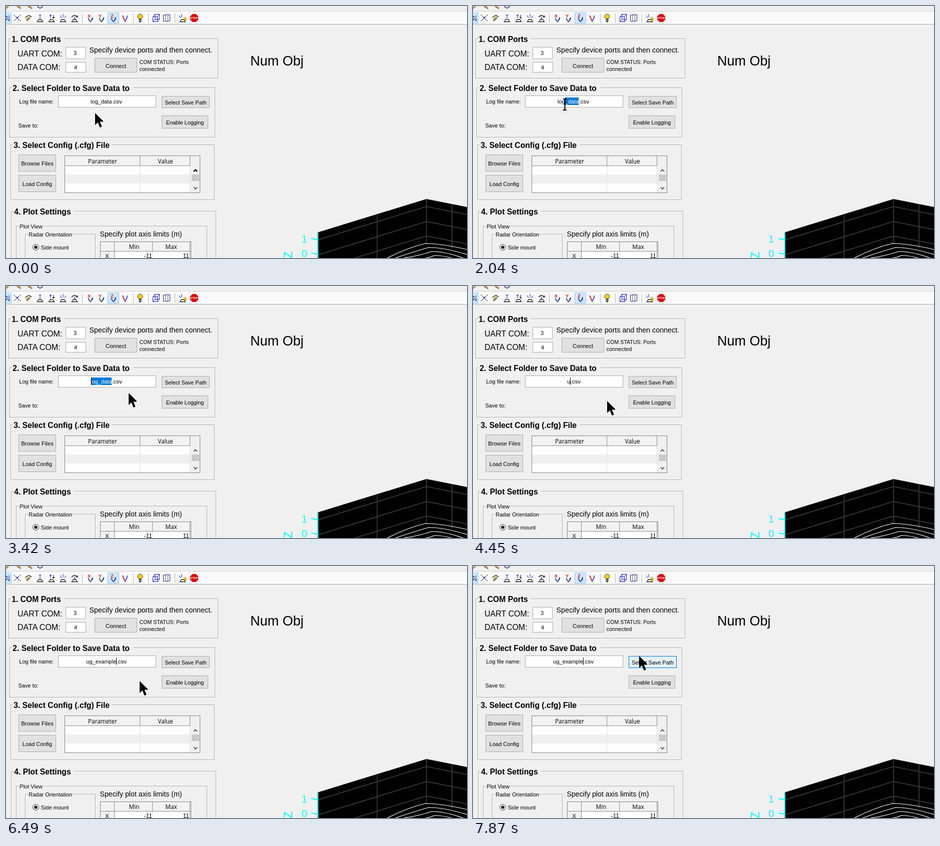
Recreate the animation shown at these times as an HTML page. Size 921 px wide and 504 px high, loop 8000 ms.

```html
<!DOCTYPE html>
<html lang="en">
<head>
<meta charset="utf-8">
<title>Radar setup</title>
<style>
html, body { margin: 0; width: 100%; height: 100%; overflow: hidden; background: #f0f0f0; }
svg { display: block; font: 11px "Liberation Sans", Arial, sans-serif; }
.head { font-family: "Open Sans", "Noto Sans", sans-serif; }
</style>
</head>
<body>
<svg id="stage" width="921" height="504" viewBox="0 0 921 504"></svg>
<script>
const stage = document.getElementById('stage');

const text = (x, y, s, size = 11, extra = '') =>
  `<text x="${x}" y="${y}" font-size="${size}" ${extra}>${s}</text>`;
const mid = 'text-anchor="middle"', end = 'text-anchor="end"';
const box = (x0, y0, x1, y1, fill, line = fill, extra = '') =>
  `<rect x="${x0 + .5}" y="${y0 + .5}" width="${x1 - x0 - 1}" height="${y1 - y0 - 1}" fill="${fill}" stroke="${line}" ${extra}/>`;
const line = (d, color = '#000', width = 1, extra = '') =>
  `<path d="${d}" fill="none" stroke="${color}" stroke-width="${width}" ${extra}/>`;
const button = (x0, y0, x1, y1, s, size, extra) =>
  box(x0, y0, x1, y1, '#e1e1e1', '#adadad', extra) +
  text((x0 + x1) / 2, Math.round((y0 + y1) / 2) + 5, s, size, mid);
const field = (x0, y0, x1, y1) => box(x0, y0, x1, y1, '#fff', '#ababab');

// Etched frame whose top edge is broken by its title
function panel(x0, y0, x1, y1, title, titleX, titleEnd, size = 15.7, weight = 'bold') {
  const d = `M${titleX - 2} ${y0 - .5}H${x0 - .5}V${y1 - .5}H${x1 - .5}V${y0 - .5}H${titleEnd + 4}`;
  return line(d, '#fff', 1, 'transform="translate(1 1)"') + line(d, '#a8a8a8') +
    text(titleX - .7, y0 + (size > 12 ? 6 : 4), title, size, `font-weight="${weight}"`);
}

function toolbar() {
  const at = (x, s) => `<g transform="translate(${x} 24)">${s}</g>`;
  const blue = '#1818d8', red = '#d01010';
  const camera = line('M-5.5 7.5L-2.5 3H2.5L5.5 7.5Z', '#222', 1.3);
  const axes = s => line('M-3 0V3L1 7.5', '#111', 1.3) + line('M1 7.5L5 2V-2M2 3L5 1', blue, 1.3) +
    text(-2, -1, s, 9, `${mid} fill="${red}" font-weight="bold"`);
  const seps = [152, 254, 284, 337].map(x => `M${x + .5} 15V34`).join('');
  return box(0, 11, 921, 36, '#fafafa') +
    line('M0 10.5H921', '#d0d0d0') + line('M0 36.5H921', '#a6a6a6') +
    line('M0 5L5 0', '#b58a45', 3) + line('M22 0L30 5M44 0L52 5', '#a87c42', 3) +
    '<circle cx="68" cy="-1" r="5" fill="#e8e8f0" stroke="#555577" stroke-width="2"/>' +
    box(-2, 13, 11, 35, '#cce8ff', '#99d1ff') + box(203, 13, 226, 35, '#cce8ff', '#90c8f6') +
    line(seps, '#b5b5b5') +
    at(1, line('M-3 -6L2 -1M-3 6L2 1', '#111', 1.5) + line('M5 -5V6M3 3L5 6L7 3', blue)) +
    at(23, line('M-7 -6L6 6M6 -6L-7 6', '#222', 1.4, 'stroke-dasharray="2 2"') +
      '<rect x="-2" y="-2" width="3" height="3" fill="#1818d8"/>') +
    at(45, line('M-6 -1Q0 -8 6 -2M-4 6L3 -1', '#222', 1.5) + line('M-5 3L0 -1L3 2', '#b09820', 2)) +
    at(68, camera + line('M0 -7V1M-2 -5L0 -7L2 -5', blue)) +
    at(91, camera + line('M-2 -6V0M-4 -4L-2 -7L0 -4', blue) + line('M4 -6V0M2 -2L4 1L6 -2')) +
    at(114, camera + line('M0 -8V-1M-6 -5L-3 0M6 -5L3 0', blue)) +
    at(137, camera + line('M-6 -2Q0 -8 6 -2M3 -2H6V-5', '#222', 1.3) + line('M0 -2V2', blue, 1.5)) +
    at(168, axes('X')) + at(190, axes('Y')) + at(214, axes('Z')) +
    at(238, line('M-5 -5L0 7', red, 1.8) + line('M0 7L4 -1V-5', blue, 1.4)) +
    at(268, '<circle cy="-3" r="4.8" fill="#ffd21c" stroke="#3c3000"/>' +
      '<path d="M-2.5 2H2.5V7L0 9L-2.5 7Z" fill="#444"/>' + line('M-2 4.5H2', '#ddd')) +
    at(300, line('M-6.5 -2.5H2.5V7.5H-6.5ZM-6.5 -2.5L-2.5 -7.5H6.5V2.5L2.5 7.5M2.5 -2.5L6.5 -7.5M-2.5 -7.5V2.5H6.5M-2.5 2.5L-6.5 7.5', blue)) +
    at(321, line('M-6.5 -5.5L-2.5 -6.5H6.5V5.5L2.5 6.5H-6.5Z', '#1c1c70') +
      line('M-2.5 -6V5M2.5 -5V6', '#1c1c70', 1, 'stroke-dasharray="2 1"')) +
    at(353, camera + line('M-2 -8V-1M-7 -5L-4 0', blue) +
      line('M5 -3V7M1 2H9M2 -1L8 5', '#d8a800', 1.3)) +
    at(376, '<path d="M-3.2 -8H3.2L8 -3.2V3.2L3.2 8H-3.2L-8 3.2V-3.2Z" fill="#dc0808"/>' +
      text(0, 2, 'STOP', 5.5, `${mid} fill="#fff" font-weight="bold"`));
}

function plot() {
  // Both back walls meet at x = 840
  const wall = y => `M622 ${y + 67}L840 ${y}L921 ${y + 16}`;
  const arc = i => `M${762 + i * 16} 504Q${800 + i * 12} ${484 + i * 8} ${838 + i * 6} ${475 + i * 8}` +
    `Q${870 + i * 6} ${475 + i * 8} 921 ${487 + i * 10}`;
  const cyan = '#00ffff', label = `fill="${cyan}"`;
  return `<path d="${wall(386)}V504H622Z"/>` +
    line([401, 431, 460].map(wall).join('') + 'M741.5 416V504M840 386V475M891 396V485', '#333', 2) +
    line([0, 1, 2, 3].map(arc).join(''), '#fff', 1.2) +
    line('M623 453V504M610 465L623 467.5M610 494L623 496.5', cyan, 2) +
    text(596, 473, '1', 20, `${label} ${mid}`) + text(596, 502, '0', 20, `${label} ${mid}`) +
    text(0, 0, 'Z', 23, `${label} ${mid} transform="translate(572 498) rotate(-90)"`);
}

function filesTable() {
  return box(117, 299, 388, 374, '#fff', '#828282') +
    box(118, 300, 387, 319, '#f2f2f2') + box(118, 337, 368, 355, '#efefef') +
    box(368, 300, 387, 373, '#f0f0f0') +
    line('M118 319.5H368M267.5 300V319M367.5 300V319', '#8c8c8c') +
    line('M267.5 320V373M367.5 320V373', '#dedede') +
    text(193, 315, 'Parameter', 11.8, `${mid} class="head"`) +
    text(318.5, 315, 'Value', 11.8, `${mid} class="head"`) +
    box(371, 337, 386, 350, '#c9c9c9') +
    '<path id="up" d="M375 331L378.5 327.5L382 331" fill="none"/>' +
    line('M375 362.5L378.5 366L382 362.5', '#404040', 1.7);
}

function limitsTable() {
  return box(188, 471, 370, 530, '#fff', '#828282') + box(189, 472, 368, 490, '#f2f2f2') +
    box(189, 490, 216, 504, '#f2f2f2') +
    line('M188 490.5H369M216.5 472V504M292.5 472V490M367.5 472V504', '#8c8c8c') +
    line('M292.5 491V504', '#dedede') +
    text(256, 486, 'Min', 11.8, `${mid} class="head"`) +
    text(330, 486, 'Max', 11.8, `${mid} class="head"`) +
    text(202, 504, 'X', 11.5, mid) + text(292, 504, '-11', 12, end) + text(366, 504, '11', 12, end);
}

stage.innerHTML = `
<clipPath id="clip"><rect class="sel" y="183" height="15"/></clipPath>` +
  toolbar() + plot() + text(488, 119, 'Num Obj', 27) +
  panel(6, 66, 424, 145, '1. COM Ports', 12, 111) +
  text(23, 101, 'UART COM:', 16) + field(119, 82, 159, 106) + text(138, 98, '3', 11, mid) +
  text(23, 128, 'DATA COM:', 16) + field(119, 112, 160, 133) + text(139, 127, '4', 11, mid) +
  text(166.5, 93, 'Specify device ports and then connect.', 14.3) +
  button(177, 104, 262, 133, 'Connect') +
  text(266.5, 116, 'COM STATUS: Ports', 10.6) + text(266.5, 130, 'connected') +
  panel(8, 164, 418, 263, '2. Select Folder to Save Data to', 14, 251) +
  text(26.3, 195, 'Log file name:') + field(104, 179, 300, 203) +
  text(24.5, 243, 'Save to:') +
  button(311, 180, 407, 204, 'Select Save Path', 10.9, 'id="save"') +
  button(311, 219, 404, 245, 'Enable Logging', 10.9) +
  panel(10, 278, 417, 388, '3. Select Config (.cfg) File', 16, 209) +
  button(25, 297, 100, 331, 'Browse Files', 11.3) + button(25, 338, 100, 372, 'Load Config') +
  filesTable() +
  panel(11, 411, 420, 520, '4. Plot Settings', 17, 132) +
  panel(21, 441, 402, 520, 'Plot View', 28, 72, 11, 'normal') +
  panel(39, 457, 179, 520, 'Radar Orientation', 46, 129, 11, 'normal') +
  text(187.5, 461, 'Specify plot axis limits (m)', 14.2) +
  '<circle cx="59.5" cy="482.5" r="6" fill="#fff" stroke="#333"/><circle cx="59.5" cy="482.5" r="3.3" fill="#222"/>' +
  text(69.5, 487, 'Side mount') + limitsTable() + `
<g id="name"><text id="stem" y="195" ${end}></text><text id="ext" y="195" font-size="11.5">.csv</text></g>
<rect class="sel" y="183" height="15" fill="#0078d7"/>
<use href="#name" fill="#fff" clip-path="url(#clip)"/>
<rect id="caret" y="183" width="1" height="15"/>
<path id="arrow" d="M0 0V24L5.5 18.8L9.6 29L13.6 27.2L9.6 17.5H16.2V16.3Z"/>
<path id="beam" d="M1 1H4L4.5 1.5L5 1H8M1 23H4L4.5 22.5L5 23H8M4.5 1.5V22.5" fill="none" stroke="#000" stroke-width="2"/>`;

// Each step lists only what changes at that time
const steps = [
  [0, { arrow: [178, 214], beam: null, stem: 'log_data', split: 211, caret: 0, sel: [0, 0], bold: true, hover: false }],
  [330, { arrow: null, beam: [207, 186], bold: false }],
  [680, { bold: true }],
  [1010, { bold: false, caret: 211 }],
  [1380, { caret: 0 }],
  [1710, { beam: [202, 185], sel: [205, 211], caret: 205 }],
  [2040, { beam: [179, 185], sel: [184, 211], caret: 184 }],
  [2390, { beam: [164, 186], sel: [170, 211], caret: 170 }],
  [2740, { beam: [162, 187], sel: [211, 233], caret: 232 }],
  [3070, { beam: [162, 185], sel: [170, 211], caret: 170 }],
  [3420, { beam: null, arrow: [245, 214] }],
  [3770, { arrow: [268, 230], caret: 0 }],
  [4100, { caret: 170 }],
  [4450, { stem: 'u', split: 194, caret: 194, sel: [0, 0] }],
  [4780, { stem: 'ug', split: 197, caret: 197 }],
  [5130, { stem: 'ug_', split: 200, caret: 200, arrow: [267, 230] }],
  [5480, { stem: 'ug_e', split: 203, caret: 203 }],
  [5810, { stem: 'ug_ex', split: 206, caret: 206 }],
  [6160, { stem: 'ug_examp', split: 216, caret: 216 }],
  [6490, { stem: 'ug_example', split: 220, caret: 220 }],
  [7190, { caret: 0 }],
  [7520, { caret: 220, arrow: [320, 182] }],
  [7870, { arrow: [332, 180], hover: true }],
];

const get = id => document.getElementById(id);
const set = (el, attrs) => { for (const k in attrs) el.setAttribute(k, attrs[k]); };
const place = (id, p) => set(get(id), p
  ? { visibility: 'visible', transform: `translate(${p})` }
  : { visibility: 'hidden' });

function draw(now) {
  const t = now % 8000;
  const s = Object.assign({}, ...steps.filter(([at]) => at <= t).map(([, change]) => change));
  place('arrow', s.arrow);
  place('beam', s.beam);
  get('stem').textContent = s.stem;
  set(get('stem'), { x: s.split + .3 });
  set(get('ext'), { x: s.split + .5 });
  set(get('caret'), { x: s.caret, visibility: s.caret ? 'visible' : 'hidden' });
  document.querySelectorAll('.sel').forEach(el => set(el, { x: s.sel[0], width: s.sel[1] - s.sel[0] }));
  set(get('up'), { stroke: s.bold ? '#000' : '#404040', 'stroke-width': s.bold ? 2.4 : 1.6 });
  set(get('save'), s.hover
    ? { fill: '#e5f1fb', stroke: '#0078d7' }
    : { fill: '#e1e1e1', stroke: '#adadad' });
}

const start = performance.now();
function loop() {
  draw(performance.now() - start);
  requestAnimationFrame(loop);
}
loop();
</script>
</body>
</html>
```
